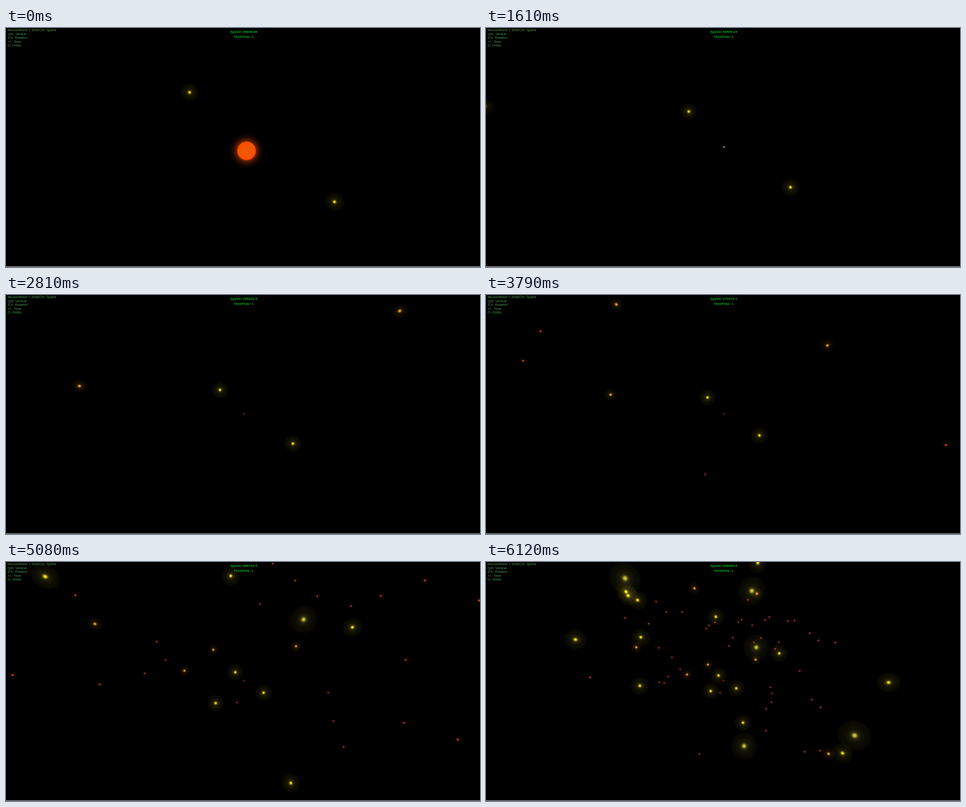
Write an HTML page with a canvas that moves like this. It is 1054 by 531 pixels and loops after 6150 ms.

```html
<!DOCTYPE html>
<html lang="en">
<head>
<meta charset="utf-8">
<title>Star field</title>
<style>
  html, body { margin: 0; width: 100%; height: 100%; overflow: hidden; background: #000; }
  canvas { display: block; }
</style>
</head>
<body>
<canvas id="stage" width="1054" height="531"></canvas>
<script>
const ctx = document.getElementById('stage').getContext('2d');
const LOOP = 6150, CENTER = { x: 528.5, y: 263.7 }, FOCAL = 520;

// Camera flight backwards: time in s, distance travelled, wheel notches so far.
const FLIGHT = [
  [0, 0, 0], [1.61, 1.78, 2], [2.81, 4.18, 9], [3.79, 7.63, 14],
  [4.51, 12.14, 20], [5.57, 23.62, 25], [6.12, 30.75, 26]
];
const END = 30.75, SPEED_SCALE = 39000;
const speedAt = notch => 45048.892 * 1.100000015 ** notch;

const GIANT = { rgb: '192,184,50', core: 6.5, halo: 29, glow: .36 };
const YELLOW = { rgb: '232,216,22', core: 4.4, halo: 18.5, glow: .34 };
const ORANGE = { rgb: '245,160,18', core: 3.6, halo: 11.5, glow: .34 };
const RED = { rgb: '225,68,20', core: 2.2, halo: 5.5, glow: .3 };

// Landmark stars: screen place and depth at the end of the flight.
const star = (kind, x, y, depth) => ({ kind, depth, x: x - CENTER.x, y: y - CENTER.y });
const stars = [
  star(YELLOW, 517, 252.15, 34), star(YELLOW, 556.5, 280.7, 35.7),
  star(YELLOW, 499.7, 286.8, 24.25), star(YELLOW, 652, 203, 26.65),
  star(YELLOW, 511, 121.5, 33.5), star(YELLOW, 337, 84.5, 25.1),
  star(YELLOW, 344, 167, 22.4), star(YELLOW, 342, 275, 14.6),
  star(YELLOW, 571.5, 357, 22.1),
  star(GIANT, 601, 189.7, 28.6), star(GIANT, 591, 64, 30.1),
  star(GIANT, 574, 409, 14), star(GIANT, 820, 385.5, 14), star(GIANT, 309, 36, 14),
  star(ORANGE, 447, 250, 34.2), star(ORANGE, 334, 189.5, 31.65),
  star(ORANGE, 493.4, 228, 27.1), star(ORANGE, 599.5, 217, 33.4),
  star(RED, 520.4, 290.3, 28.8), star(RED, 413.5, 212, 32.2)
];

// The rest are scattered around the centre, mostly above it.
let seed = 7;
const random = () => (seed = seed * 16807 % 2147483647) / 2147483647;
const between = (low, high) => low + (high - low) * random();

function scatter(count, kind, [near, far], [shallow, deep]) {
  for (let i = 0; i < count; i++) {
    const angle = -Math.PI / 2 + (random() + random() - 1) * Math.PI;
    const radius = between(near, far);
    stars.push({
      kind, depth: between(shallow, deep),
      x: radius * 1.2 * Math.cos(angle), y: radius * .9 * Math.sin(angle)
    });
  }
}
scatter(42, RED, [85, 250], [14, 31]);
scatter(6, YELLOW, [260, 310], [13, 15]);
scatter(3, ORANGE, [220, 270], [13, 15]);

function flightAt(t) {
  let i = 0;
  while (i < FLIGHT.length - 2 && t >= FLIGHT[i + 1][0]) i++;
  const [t0, z0, n0] = FLIGHT[i], [t1, z1, n1] = FLIGHT[i + 1];
  const span = t1 - t0, s = (t - t0) / span;
  const v0 = speedAt(n0) / SPEED_SCALE * span, v1 = speedAt(n1) / SPEED_SCALE * span;
  const blend = s * s * (3 - 2 * s);
  return {
    distance: z0 + (z1 - z0) * blend + v0 * s * (1 - s) ** 2 + v1 * s * s * (s - 1),
    notch: Math.floor(n0 + (n1 - n0) * s + .02)
  };
}

function disc(x, y, radius, fill) {
  ctx.fillStyle = fill;
  ctx.beginPath();
  ctx.arc(x, y, radius, 0, 2 * Math.PI);
  ctx.fill();
}

function radial(x, y, radius, stops) {
  const gradient = ctx.createRadialGradient(x, y, 0, x, y, radius);
  for (const [at, color] of stops) gradient.addColorStop(at, color);
  disc(x, y, radius, gradient);
}

function drawStar({ kind, x, y, depth }, distance) {
  const now = depth + distance - END;
  if (now <= .3) return;
  const dx = x * depth / now, dy = y * depth / now;
  if (Math.abs(dx) > 600 || Math.abs(dy) > 340) return;
  const { rgb, core, halo, glow } = kind;
  const color = alpha => `rgba(${rgb},${alpha})`;
  // Wide-angle perspective pulls spheres outwards near the edges.
  const stretch = 1 + (dx * dx + dy * dy) / FOCAL ** 2;
  const angle = Math.atan2(dy, dx);
  ctx.save();
  ctx.translate(CENTER.x + dx, CENTER.y + dy);
  ctx.rotate(angle);
  ctx.scale(stretch, Math.sqrt(stretch));
  ctx.rotate(-angle);
  radial(0, 0, halo, [
    [0, color(glow)], [.2, color(glow * .65)], [.35, color(glow * .33)],
    [.6, color(glow * .18)], [.92, color(glow * .1)], [1, color(0)]
  ]);
  radial(0, 0, core, [[0, color(.85)], [.4, color(.6)], [.7, color(.2)], [1, color(0)]]);
  ctx.restore();
}

function drawSun(distance) {
  const scale = .13 / (.13 + distance);
  const x = CENTER.x + 6.5 * scale, y = CENTER.y + 9.3 * scale;
  const radius = Math.max(20.5 * scale, 1);
  const hue = distance < 1.8 ? 18 + 15 * distance : 13 + 32 * Math.exp((1.8 - distance) / 2);
  const color = (light, alpha) => `hsla(${hue},100%,${light}%,${alpha})`;
  radial(x, y, radius * 1.95, [
    [0, color(48, .6)], [.5, color(48, .6)], [.62, color(46, .32)],
    [.8, color(44, .1)], [1, color(42, 0)]
  ]);
  disc(x, y, radius, color(50, 1));
  if (radius > 4) radial(x, y, radius * .85, [
    [0, 'rgba(232,92,10,.9)'], [.75, 'rgba(238,88,8,.7)'], [1, 'rgba(245,85,5,0)']
  ]);
}

function drawText(notch) {
  ctx.textAlign = 'left';
  ctx.font = '7.57px "Liberation Sans", Arial, sans-serif';
  ctx.fillStyle = '#4a964e';
  ['MouseWheel + Shift/Ctrl: Speed', 'Q/E: Vertical', 'Z/X: Rotation', '+/-: Time', 'O: Orbits']
    .forEach((line, i) => ctx.fillText(line, 3.7, 7.2 + 8.5 * i));
  ctx.textAlign = 'center';
  ctx.font = 'bold 7.65px "Liberation Sans", Arial, sans-serif';
  ctx.fillStyle = '#00b01c';
  ctx.fillText('Speed: ' + Number(speedAt(notch).toPrecision(7)), 528.7, 10.9);
  ctx.fillText('TimeFlow: 1', 528.2, 21.5);
}

function draw(now) {
  const { distance, notch } = flightAt(now % LOOP / 1000);
  ctx.globalCompositeOperation = 'source-over';
  ctx.fillStyle = '#000';
  ctx.fillRect(0, 0, 1054, 531);
  drawSun(distance);
  ctx.globalCompositeOperation = 'lighter';
  for (const each of stars) drawStar(each, distance);
  ctx.globalCompositeOperation = 'source-over';
  drawText(notch);
  ctx.fillStyle = '#8c8c8c';
  ctx.fillRect(0, 529.4, 1054, 1.6);
}

const start = performance.now();
function tick() {
  draw(performance.now() - start);
  requestAnimationFrame(tick);
}
tick();
</script>
</body>
</html>
```
